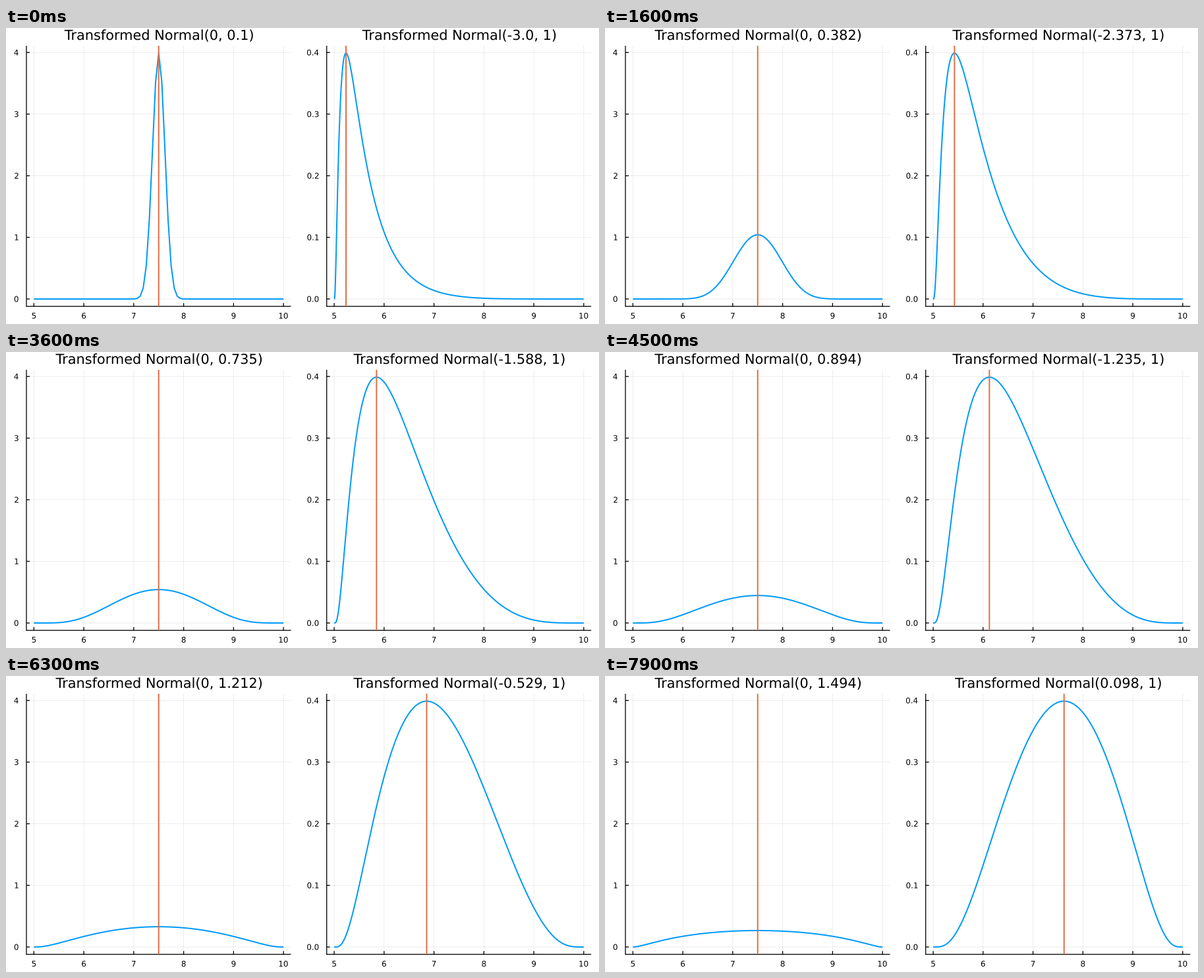
Animation of 900x450 px, one loop 8000 ms. Source, as a matplotlib script:

```python
import numpy as np
import matplotlib.pyplot as plt
from matplotlib.animation import FuncAnimation
from matplotlib.patches import PathPatch
from matplotlib.textpath import TextPath
from matplotlib.transforms import Affine2D

W, H, DPI = 900, 450, 100
FRAMES, INTERVAL = 80, 100
LOW, HIGH = 5, 10
TOP, BOTTOM, AX_W = H - 27, H - 423.2, 401.5
MARGIN = 0.03
TICK = 5
BLUE, ORANGE = "#009af9", "#e26f46"

plt.rcParams["font.family"] = "DejaVu Sans"


def squash(z):
    """Map the real line onto the interval (LOW, HIGH)."""
    return LOW + (HIGH - LOW) / (1 + np.exp(-z))


def pdf(z, mu, sigma):
    return np.exp(-0.5 * ((z - mu) / sigma) ** 2) / (sigma * np.sqrt(2 * np.pi))


def num(v):
    return str(round(float(v), 3))


def line(xs, ys, color="black", width=1.3, **style):
    return canvas.plot(xs, ys, color=color, lw=width * 72 / DPI, snap=False,
                       solid_capstyle="butt", solid_joinstyle="round", **style)[0]


def outline(text, x, y, size, align=0.5, middle=False):
    """Glyph outlines in pixels, placed on a baseline or centred on y."""
    path = TextPath((0, 0), text, size=size)
    box = path.get_extents()
    dx = x - box.x0 - align * box.width
    dy = y - (box.y0 + box.height / 2 if middle else 0)
    return Affine2D().translate(dx, dy).transform_path(path)


def label(path):
    return canvas.add_patch(PathPatch(path, fc="black", lw=0, snap=False))


class Panel:
    def __init__(self, left, peak, ticks):
        self.left, self.peak = left, peak
        right = left + AX_W

        for v in range(LOW, HIGH + 1):
            x = self.px(v)
            line([x, x], [BOTTOM, TOP], width=0.7, alpha=0.1)
            line([x, x], [BOTTOM, BOTTOM + TICK])
            label(outline(str(v), x, H - 437.4, 11.9, middle=True))
        for text in ticks:
            y = self.py(float(text))
            line([left, right], [y, y], width=0.7, alpha=0.1)
            line([left, left + TICK], [y, y])
            label(outline(text, left - 12.3, y, 11.9, align=1, middle=True))

        line([left, left], [BOTTOM - 0.65, TOP])
        line([left, right], [BOTTOM, BOTTOM])
        self.curve = line(self.px(X), 0 * X, BLUE, 2)
        self.mode = line([0, 0], [BOTTOM, TOP], ORANGE, 2)
        self.title = label(outline("0", 0, 0, 1))

    def px(self, v):
        u = (v - LOW) / (HIGH - LOW)
        return self.left + AX_W * (u + MARGIN) / (1 + 2 * MARGIN)

    def py(self, v):
        return BOTTOM + (TOP - BOTTOM) * (v / self.peak + MARGIN) / (1 + 2 * MARGIN)

    def show(self, mu, sigma, title):
        self.curve.set_ydata(self.py(pdf(Z, mu, sigma)))
        self.mode.set_xdata([self.px(squash(mu))] * 2)
        self.title.set_path(outline(title, self.left + AX_W / 2, H - 18, 20.85))


Z = np.linspace(-10, 10, 401)
X = squash(Z)
PEAK = pdf(0, 0, 1)

fig = plt.figure(figsize=(W / DPI, H / DPI), dpi=DPI, facecolor="white")
canvas = fig.add_axes([0, 0, 1, 1])
canvas.set(xlim=(0, W), ylim=(0, H), autoscale_on=False)
canvas.axis("off")

spread = Panel(31, 10 * PEAK, [str(i) for i in range(5)])
shift = Panel(486.7, PEAK, [f"{i / 10:.1f}" for i in range(5)])


def draw(i):
    sigma = 0.1 + 0.9 * i / 51
    mu = -3 + 2 * i / 51
    spread.show(0, sigma, f"Transformed Normal(0, {num(sigma)})")
    shift.show(mu, 1, f"Transformed Normal({num(mu)}, 1)")
    return []


anim = FuncAnimation(fig, draw, frames=FRAMES, interval=INTERVAL,
                     repeat=True, repeat_delay=0)
plt.show()
```
